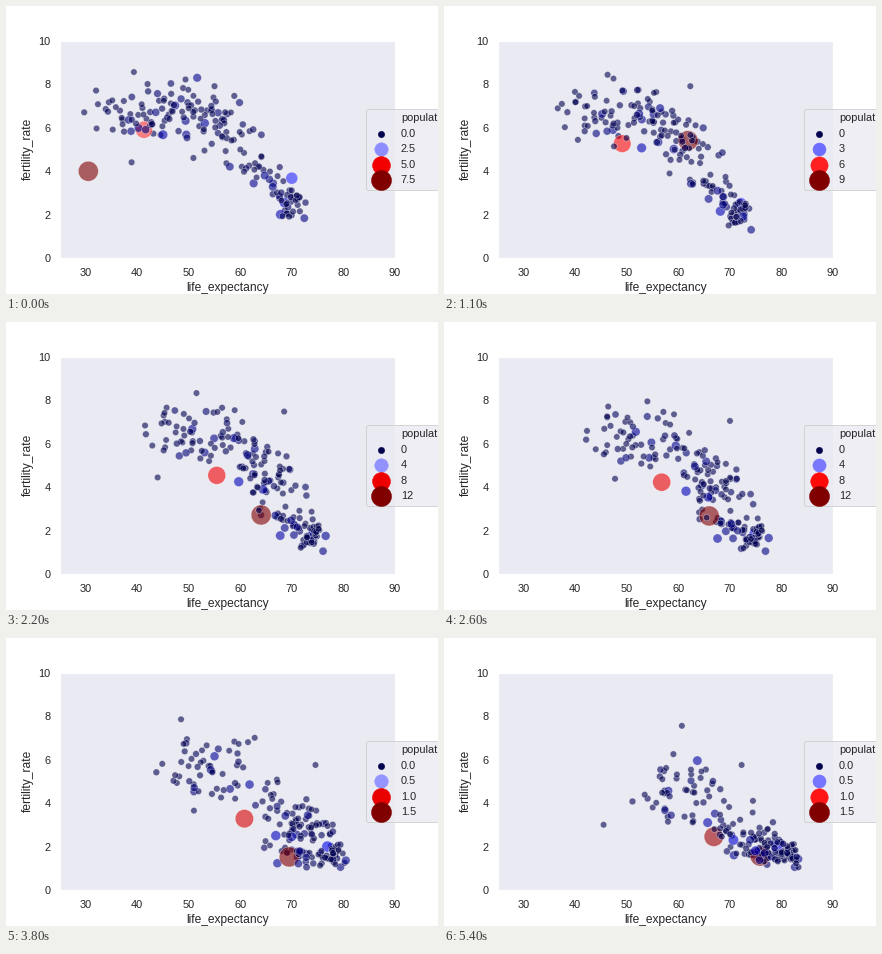
Recreate the animation shown at these times as a matplotlib script. Size 432 by 288 pixels, loop 5500 ms.

```python
import numpy as np
import matplotlib.pyplot as plt
from matplotlib.animation import FuncAnimation

FRAMES, INTERVAL = 55, 100
INK, PANEL = "0.15", "#eaeaf2"
YEARS = np.arange(FRAMES)
KEYS = [0, 18, 38, 54]   # years since the start

plt.rcParams.update({
    "font.family": "sans-serif",
    "font.sans-serif": ["Liberation Sans"],
    "text.color": INK,
    "axes.labelcolor": INK,
    "axes.labelsize": 12,
    "xtick.labelsize": 11,
    "ytick.labelsize": 11,
    "legend.fontsize": 11,
    "xtick.color": INK,
    "ytick.color": INK,
})

# Most populous country, with its own turning points
GIANT_YEARS = [0, 1, 3, 8, 11, 18, 26, 38, 46, 54]
GIANT_LIFE = [30.5, 34, 48, 58.5, 61.9, 62.1, 66, 69.5, 72.6, 75.9]
GIANT_FERT = [3.99, 3.3, 6.9, 6.3, 5.4, 2.76, 2.67, 1.52, 1.5, 1.56]
GIANT_POP = [6.45, 9.6, 12.55, 13.7]

# (first and last population in 1e8, life at KEYS, fertility at KEYS)
LARGE = [
    (4.5, 12.9, [41.3, 54.1, 60.8, 66.9], [5.9, 4.85, 3.28, 2.45]),
    (1.86, 3.2, [70, 73.5, 76.9, 79.1], [3.67, 1.77, 2.0, 1.95]),
    (0.87, 2.55, [45, 57.9, 66.9, 70.7], [5.67, 4.68, 2.5, 2.3]),
    (1.2, 1.43, [68.6, 67.9, 67.2, 70.8], [2.55, 1.9, 1.23, 1.6]),
    (0.93, 1.27, [67.8, 75.6, 80.5, 83.3], [2.0, 1.85, 1.36, 1.43]),
    (0.72, 2.04, [53.1, 63, 70, 75], [6.2, 4.25, 2.45, 1.8]),
    (0.45, 1.76, [38.3, 49.6, 55, 63.7], [6.35, 6.8, 6.15, 5.95]),
    (0.45, 1.85, [43.6, 58, 61.8, 65.7], [6.7, 6.6, 4.85, 3.1]),
]

# Small countries that stray from the crowd
STRAYS = [
    ([38.9, 53, 59.5, 63.5], [4.4, 5.6, 4.8, 4.0]),
    ([41, 40.2, 59, 67], [6.9, 4.5, 4.2, 2.8]),
    ([42, 49, 61.5, 66], [8.0, 8.7, 6.8, 4.3]),
    ([32, 45, 48.5, 60.7], [7.7, 7.6, 7.85, 7.55]),
    ([55, 67, 74.6, 74.5], [7.9, 7.9, 5.75, 4.1]),
    ([29.7, 41, 62.8, 72.3], [6.7, 7.0, 7.0, 5.75]),
    ([50.9, 58, 51, 45.5], [4.6, 6.5, 3.65, 3.0]),
]

# Crowds: (count, tilt, life spread, life mean, fertility mean, fertility spread)
CROWDS = [
    (32, -0.2, 1.5, [70, 72.8, 77.4, 81], [2.6, 1.85, 1.6, 1.65], [0.42, 0.25]),
    (22, -0.5, 2.6, [65.5, 69.5, 70.8, 75.5], [3.6, 2.4, 1.6, 1.6], [0.8, 0.2]),
    (46, -0.6, 3.8, [56.5, 64, 72, 76], [6.1, 4.6, 2.8, 2.15], [1.1, 0.45]),
    (28, -0.5, 4.7, [48, 58.5, 69, 73], [7, 6.6, 4, 2.9], [0.7, 0.8]),
    (46, -0.2, 4.7, [41.5, 50, 53, 60], [6.6, 6.7, 5.7, 4.6], [0.55, 0.95]),
]


def over_years(values):
    return np.interp(YEARS, KEYS, values)


def crowd_paths(rng, count, tilt, life_sd, life, fert, fert_sd):
    """Paths of one crowd, each member drifting slowly inside it."""
    z = np.clip(rng.normal(size=(4, count, 1)), -2, 2)
    turn = YEARS / FRAMES
    u = z[0] * np.cos(turn) + z[1] * np.sin(turn)
    v = z[2] * np.cos(turn) + z[3] * np.sin(turn)
    v = tilt * u + np.sqrt(1 - tilt ** 2) * v
    pop = np.clip(rng.lognormal(-2.8, 1.3, (count, 1)), 0.005, 0.6)
    return (over_years(life) + life_sd * u,
            np.maximum(over_years(fert) + np.linspace(*fert_sd, FRAMES) * v, 1.05),
            pop * (1 + turn))


def build():
    rng = np.random.default_rng(12)
    parts = [crowd_paths(rng, *crowd) for crowd in CROWDS]
    for first, last, life, fert in LARGE:
        parts.append((over_years(life), over_years(fert),
                      np.linspace(first, last, FRAMES)))
    for life, fert in STRAYS:
        parts.append((over_years(life), over_years(fert), np.full(FRAMES, 0.05)))
    parts.append((np.interp(YEARS, GIANT_YEARS, GIANT_LIFE),
                  np.interp(YEARS, GIANT_YEARS, GIANT_FERT),
                  over_years(GIANT_POP)))
    data = [np.vstack(rows) for rows in zip(*parts)]
    order = rng.permutation(len(data[0]))
    return [rows[order] for rows in data]


LIFE, FERT, POP = build()
CMAP = plt.get_cmap("seismic")


def look(pop, top):
    """Marker areas and colours for populations."""
    share = np.clip(np.asarray(pop) / top, 0, 1)
    return 40 + 360 * share, CMAP(share)


def legend_ticks(top):
    step = next(s for s in (2.5, 3, 4, 5) if 3 * s >= top)
    ticks = step * np.arange(4)
    if step == 5:
        return ticks, [f"{t / 10:.1f}" for t in ticks]
    return ticks, [f"{t:.1f}" if step == 2.5 else f"{t:.0f}" for t in ticks]


fig = plt.figure(figsize=(6, 4), dpi=72, facecolor="white")
ax = fig.add_axes([0.125, 0.125, 0.775, 0.755])


def draw(i):
    ax.clear()
    ax.set_facecolor(PANEL)
    ax.set(xlim=(25, 90), ylim=(0, 10), xticks=range(30, 91, 10),
           yticks=range(0, 11, 2), xlabel="life_expectancy", ylabel="fertility_rate")
    ax.tick_params(length=0, pad=9.5)
    ax.spines[:].set(color="white", linewidth=1.25)

    top = POP[:, i].max()
    area, color = look(POP[:, i], top)
    ax.scatter(LIFE[:, i], FERT[:, i], s=area, c=color, alpha=0.6,
               edgecolors="white", linewidths=0.5)

    ticks, labels = legend_ticks(top)
    handles = [ax.scatter([], [], s=0, color="white", label="population")]
    for s, c, text in zip(*look(ticks, top), labels):
        handles.append(ax.scatter([], [], s=s, color=[c], linewidths=0.5, label=text))
    ax.legend(handles=handles, loc="center right", bbox_to_anchor=(1.2, 0.5),
              scatterpoints=1, facecolor=PANEL, edgecolor="0.8", framealpha=0.8)
    return []


anim = FuncAnimation(fig, draw, frames=FRAMES, interval=INTERVAL,
                     init_func=lambda: draw(0), repeat=True, repeat_delay=0)
plt.show()
```
